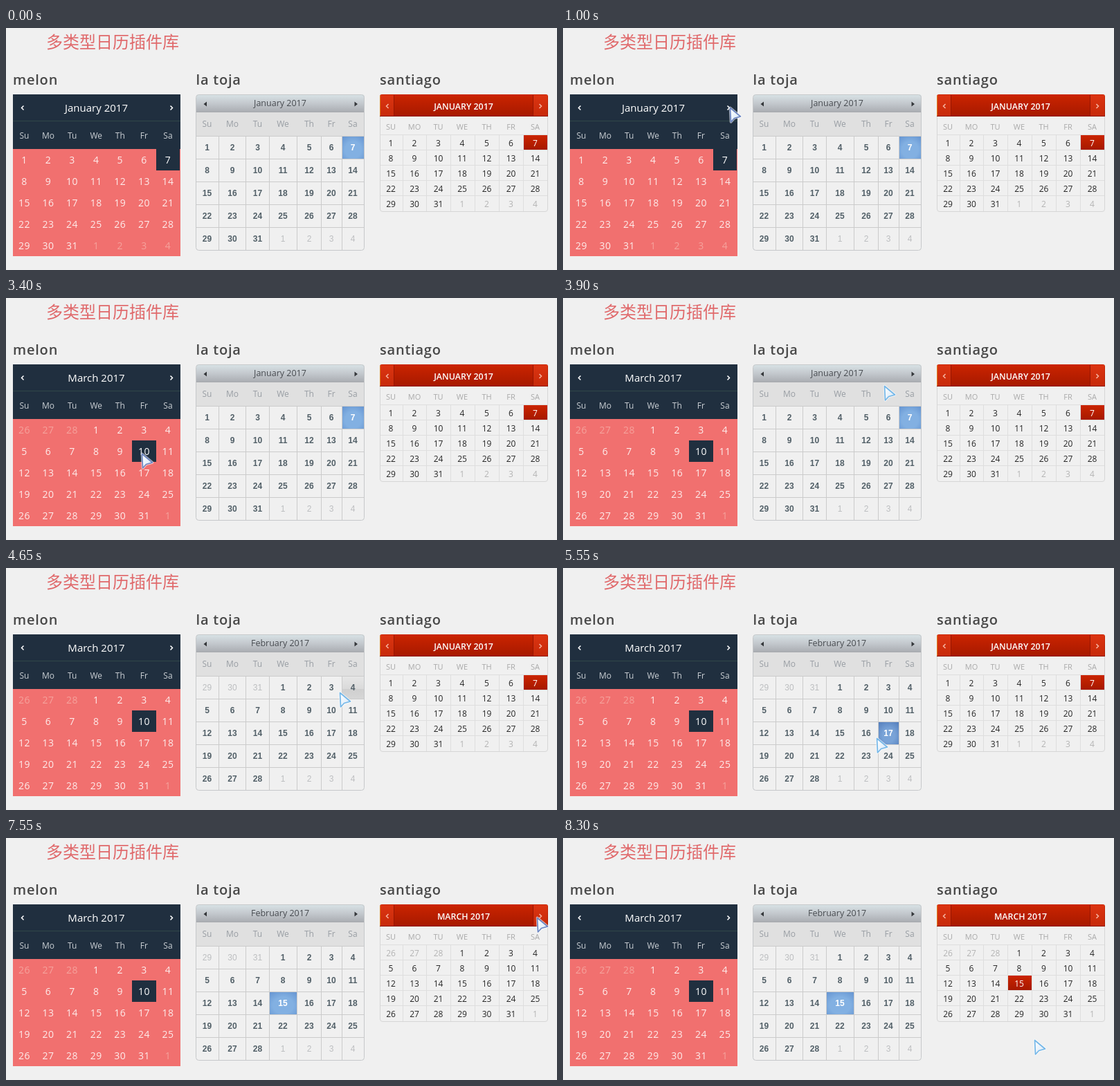
Animation, 796 px wide and 350 px high, one loop 8350 ms. Source, as an HTML page:

```html
<!DOCTYPE html>
<html lang="zh">
<head>
<meta charset="utf-8">
<title>多类型日历插件库</title>
<style>
html, body { margin: 0; width: 100%; height: 100%; overflow: hidden; background: #f0f0f0; }
svg { display: block; width: 796px; height: 350px; font-family: "Open Sans", "Noto Sans", sans-serif; }
.mid { text-anchor: middle; }
.title { font: 24px "Noto Sans CJK SC", "Noto Sans CJK", sans-serif; fill: #e0696b; }
.name { font-size: 20px; font-weight: 600; letter-spacing: .8px; fill: #484848; }
.melon .month { font-size: 15px; fill: #fff; }
.melon .week { font-size: 12px; fill: #cbd0d5; }
.melon .day { font-size: 14px; letter-spacing: .5px; }
.toja .month { font-size: 12.5px; fill: #474b50; }
.toja .week { font-size: 12px; fill: #989da3; }
.toja .day { font: bold 12px "Liberation Sans", Arial, sans-serif; }
.toja .day.dim { font-weight: normal; }
.santiago .month { font-size: 12.4px; font-weight: 600; fill: #fff; text-transform: uppercase; }
.santiago .week { font-size: 11px; fill: #a9a9a9; text-transform: uppercase; }
.santiago .day { font-size: 12px; }
</style>
</head>
<body>
<svg id="stage" viewBox="0 0 796 350">
  <defs>
    <linearGradient id="steel" x2="0" y2="1">
      <stop stop-color="#d8e3e6"/><stop offset=".45" stop-color="#c6cbd0"/><stop offset="1" stop-color="#a9acb1"/>
    </linearGradient>
    <linearGradient id="gloss" x2="0" y2="1">
      <stop stop-color="#e6e6e6"/><stop offset=".55" stop-color="#dadada"/>
      <stop offset=".55" stop-color="#cfcfcf"/><stop offset="1" stop-color="#d6d6d6"/>
    </linearGradient>
    <radialGradient id="blue" r=".75" cy=".6">
      <stop offset=".5" stop-color="#82b0e2"/><stop offset="1" stop-color="#6796d2"/>
    </radialGradient>
    <radialGradient id="deepBlue" r=".75" cy=".6">
      <stop offset=".4" stop-color="#79a3d7"/><stop offset="1" stop-color="#557fbd"/>
    </radialGradient>
    <linearGradient id="red" x2="0" y2="1">
      <stop stop-color="#cb2400"/><stop offset="1" stop-color="#a61900"/>
    </linearGradient>
    <linearGradient id="brightRed" x2="0" y2="1">
      <stop stop-color="#dc3411"/><stop offset="1" stop-color="#c62a0a"/>
    </linearGradient>
    <linearGradient id="ice" x2="1" y2="1">
      <stop stop-color="#fff"/><stop offset="1" stop-color="#d3e6f7"/>
    </linearGradient>
  </defs>
</svg>
<script>
const LOOP = 8350, STEP = 50;
const stage = document.getElementById('stage');
const MONTHS = ['January', 'February', 'March'];
const WEEK = ['Su', 'Mo', 'Tu', 'We', 'Th', 'Fr', 'Sa'];
const LENGTHS = [31, 28, 31], OFFSETS = [0, 3, 3];

function add(parent, tag, attrs, text) {
  const el = document.createElementNS(stage.namespaceURI, tag);
  set(el, attrs);
  if (text) el.textContent = text;
  return parent.appendChild(el);
}
function set(el, attrs) {
  for (const key in attrs) el.setAttribute(key, attrs[key]);
}
const rect = (g, x, y, width, height, fill, more) => add(g, 'rect', { x, y, width, height, fill, ...more });
const path = (g, d, more) => add(g, 'path', { d, fill: 'none', ...more });
const evenEdges = (start, width) => Array.from({ length: 8 }, (_, i) => Math.round(start + width * i));

function gridLines(g, cal, stroke, top) {
  const { edges, rowTop, rowStep } = cal;
  const bottom = rowTop + rowStep * 5;
  let d = edges.slice(1, 7).map(x => `M${x - .5} ${top}V${bottom}`).join('');
  for (let r = 0; r < 5; r++) d += `M${edges[0]} ${rowTop + r * rowStep - .5}H${edges[7]}`;
  path(g, d, { stroke });
}

const calendars = [
  {
    skin: 'melon', name: 'melon', nameX: 10, edges: evenEdges(9, 34.6),
    centers: WEEK.map((_, i) => 26.4 + 34.6 * i),
    rowTop: 175, rowStep: 31, cellHeight: 31, baseline: 21, weekY: 160, titleX: 130.5, titleY: 121,
    ink: '#fdeceb', dim: '#f5a29c', lit: '#fff', hover: '#202f3f', pick: '#202f3f', both: '#202f3f',
    months: [[0, 0], [1100, 1], [1400, 2]],
    picks: [[0, [0, 7]], [2900, [2, 10]]],
    back(g) {
      rect(g, 10, 96, 242, 79, '#202f3f');
      rect(g, 10, 134, 242, 1, '#304648');
      rect(g, 10, 175, 242, 155, '#f1706f');
    },
    front(g) {
      path(g, 'M25.5 112.5L22.5 115.5L25.5 118.5M237.5 112.5L240.5 115.5L237.5 118.5', { stroke: '#fff', 'stroke-width': 1.5 });
    }
  },
  {
    skin: 'toja', name: 'la toja', nameX: 274.5, edges: [275, 308, 347, 381, 421, 456, 486, 518],
    centers: [290.5, 327, 363.5, 400, 438, 470, 501],
    rowTop: 157, rowStep: 33, cellHeight: 32, baseline: 20, weekY: 143, titleX: 396, titleY: 113,
    ink: '#526068', dim: '#bcbec0', lit: '#fff', hover: 'url(#gloss)', pick: 'url(#blue)', both: 'url(#deepBlue)',
    months: [[0, 0], [4100, 1]],
    picks: [[0, [0, 7]], [5250, [1, 17]], [5800, [1, 15]]],
    back(g) {
      path(g, 'M275 122V100Q275 96 279 96H514Q518 96 518 100V122Z', { fill: 'url(#steel)' });
      rect(g, 275, 121, 243, 1, '#a6a9ad');
      rect(g, 275, 122, 243, 34, '#e0e0e0');
    },
    front(g, cal) {
      gridLines(g, cal, '#cbcbcb', 157);
      rect(g, 274.5, 96.5, 243, 225, 'none', { rx: 4, stroke: '#c6c8ca' });
      path(g, 'M290 106.5V113.5L285.5 110ZM503.5 106.5V113.5L508 110Z', { fill: '#34373a' });
    }
  },
  {
    skin: 'santiago', name: 'santiago', nameX: 540, edges: [540, 574, 608, 643, 678, 713, 748, 783],
    centers: [556, 590, 624.5, 659, 694.5, 729.5, 764.5],
    rowTop: 155, rowStep: 22, cellHeight: 21, baseline: 15.5, weekY: 147, titleX: 661, titleY: 118,
    ink: '#262626', dim: '#b4b4b4', lit: '#fff', hover: '#dddddd', pick: 'url(#red)', both: 'url(#red)',
    months: [[0, 0], [6750, 1], [6950, 2]],
    picks: [[0, [0, 7]], [7950, [2, 15]]],
    back(g) {
      path(g, 'M540 128V99Q540 96 543 96H780Q783 96 783 99V128Z', { fill: 'url(#red)' });
      rect(g, 541, 97, 19, 31, 'url(#brightRed)');
      rect(g, 762, 97, 20, 31, 'url(#brightRed)');
      rect(g, 560, 97, 1, 31, '#981600');
      rect(g, 761, 97, 1, 31, '#981600');
      rect(g, 540, 98, 1, 30, '#dc7a1c');
      rect(g, 540, 127, 243, 1, '#8f1500');
    },
    front(g, cal) {
      gridLines(g, cal, '#dedede', 155);
      path(g, 'M540.5 128V262Q540.5 265.5 544 265.5H779Q782.5 265.5 782.5 262V128', { stroke: '#d6d6d6' });
      path(g, 'M552.5 110L549.5 113L552.5 116M770.5 110L773.5 113L770.5 116', { stroke: '#f7b7a5', 'stroke-width': 1.5 });
    }
  }
];

add(stage, 'text', { x: 58, y: 29, class: 'title' }, '多类型日历插件库');

for (const cal of calendars) {
  add(stage, 'text', { x: cal.nameX, y: 82, class: 'name' }, cal.name);
  const g = add(stage, 'g', { class: cal.skin });
  cal.back(g);
  cal.title = add(g, 'text', { x: cal.titleX, y: cal.titleY, class: 'month mid' });
  WEEK.forEach((day, i) => add(g, 'text', { x: cal.centers[i], y: cal.weekY, class: 'week mid' }, day));
  cal.cells = Array.from({ length: 35 }, (_, i) => {
    const col = i % 7, y = cal.rowTop + Math.floor(i / 7) * cal.rowStep;
    const x = cal.edges[col], gap = cal.skin === 'melon' ? 0 : 1;
    return {
      box: rect(g, x, y, cal.edges[col + 1] - x - gap, cal.cellHeight, 'none'),
      label: add(g, 'text', { x: cal.centers[col], y: y + cal.baseline })
    };
  });
  cal.front(g, cal);
}

const pointer = add(stage, 'g', {});
const ARROW = 'M.5 .5L1.5 21L6.5 15.5L15.5 13Z';
path(pointer, ARROW, { stroke: '#fff', 'stroke-width': 3.6, 'stroke-linejoin': 'round', opacity: .6 });
const arrow = path(pointer, ARROW, { fill: 'url(#ice)', 'stroke-width': 1.7, 'stroke-linejoin': 'round' });

// Pointer tip: [time, x, y]
const route = [
  [50, 371, 262], [500, 371, 262], [1050, 238, 111], [2000, 238, 111], [2250, 191, 205],
  [2650, 196, 210], [2750, 196, 210], [2900, 197, 217], [3350, 197, 217], [3400, 196, 225],
  [4050, 506, 112], [4500, 506, 112], [4650, 482, 180], [4850, 463, 178], [5000, 463, 178],
  [5250, 462, 240], [5500, 462, 240], [5550, 453, 246], [5800, 398, 244], [5950, 398, 244],
  [6500, 758, 111], [6600, 771, 112], [7500, 771, 112], [7950, 655, 213], [8100, 655, 213],
  [8300, 681, 292]
];

function tipAt(t) {
  const next = route.findIndex(stop => stop[0] > t);
  if (next === 0) return route[0].slice(1);
  if (next < 0) return route[route.length - 1].slice(1);
  const [t0, x0, y0] = route[next - 1], [t1, x1, y1] = route[next];
  const p = (t - t0) / (t1 - t0), ease = p * p * (3 - 2 * p);
  return [x0 + (x1 - x0) * ease, y0 + (y1 - y0) * ease];
}

const valueAt = (list, t) => list.filter(([start]) => start <= t).pop()[1];

function cellUnder(cal, [x, y]) {
  const row = Math.floor((y - cal.rowTop) / cal.rowStep);
  const col = cal.edges.findIndex((edge, i) => x >= edge && x < cal.edges[i + 1]);
  return row < 0 || row > 4 || col < 0 ? -1 : row * 7 + col;
}

function drawCalendar(cal, t) {
  const month = valueAt(cal.months, t);
  const [pickMonth, pickDay] = valueAt(cal.picks, t);
  // Hover trails the pointer by one step.
  const under = t > STEP ? cellUnder(cal, tipAt(t - STEP)) : -1;
  cal.title.textContent = MONTHS[month] + ' 2017';
  cal.cells.forEach(({ box, label }, i) => {
    const day = i - OFFSETS[month] + 1, length = LENGTHS[month];
    const outside = day < 1 || day > length;
    const picked = month === pickMonth && day === pickDay;
    const hovered = i === under && !outside;
    const state = picked ? (hovered ? 'both' : 'pick') : hovered ? 'hover' : '';
    label.textContent = day < 1 ? day + LENGTHS[(month + 2) % 3] : day > length ? day - length : day;
    const bright = picked || (hovered && cal.skin === 'melon');
    set(label, { class: 'day mid' + (outside ? ' dim' : ''), fill: outside ? cal.dim : bright ? cal.lit : cal.ink });
    box.setAttribute('fill', cal[state] || 'none');
  });
}

function drawPointer(t) {
  const [x, y] = tipAt(t);
  const overColour = (x < 252 && y > 96) || (x > 540 && y < 128);
  pointer.setAttribute('transform', `translate(${Math.round(x)} ${Math.round(y)})`);
  pointer.setAttribute('visibility', t < STEP ? 'hidden' : 'visible');
  arrow.setAttribute('stroke', overColour ? '#6c86c2' : '#74b7e8');
}

let lastTick = -1;
const begin = performance.now();
function frame() {
  const t = Math.floor(((performance.now() - begin) % LOOP) / STEP) * STEP;
  if (t !== lastTick) {
    lastTick = t;
    calendars.forEach(cal => drawCalendar(cal, t));
    drawPointer(t);
  }
  requestAnimationFrame(frame);
}
frame();
</script>
</body>
</html>
```
